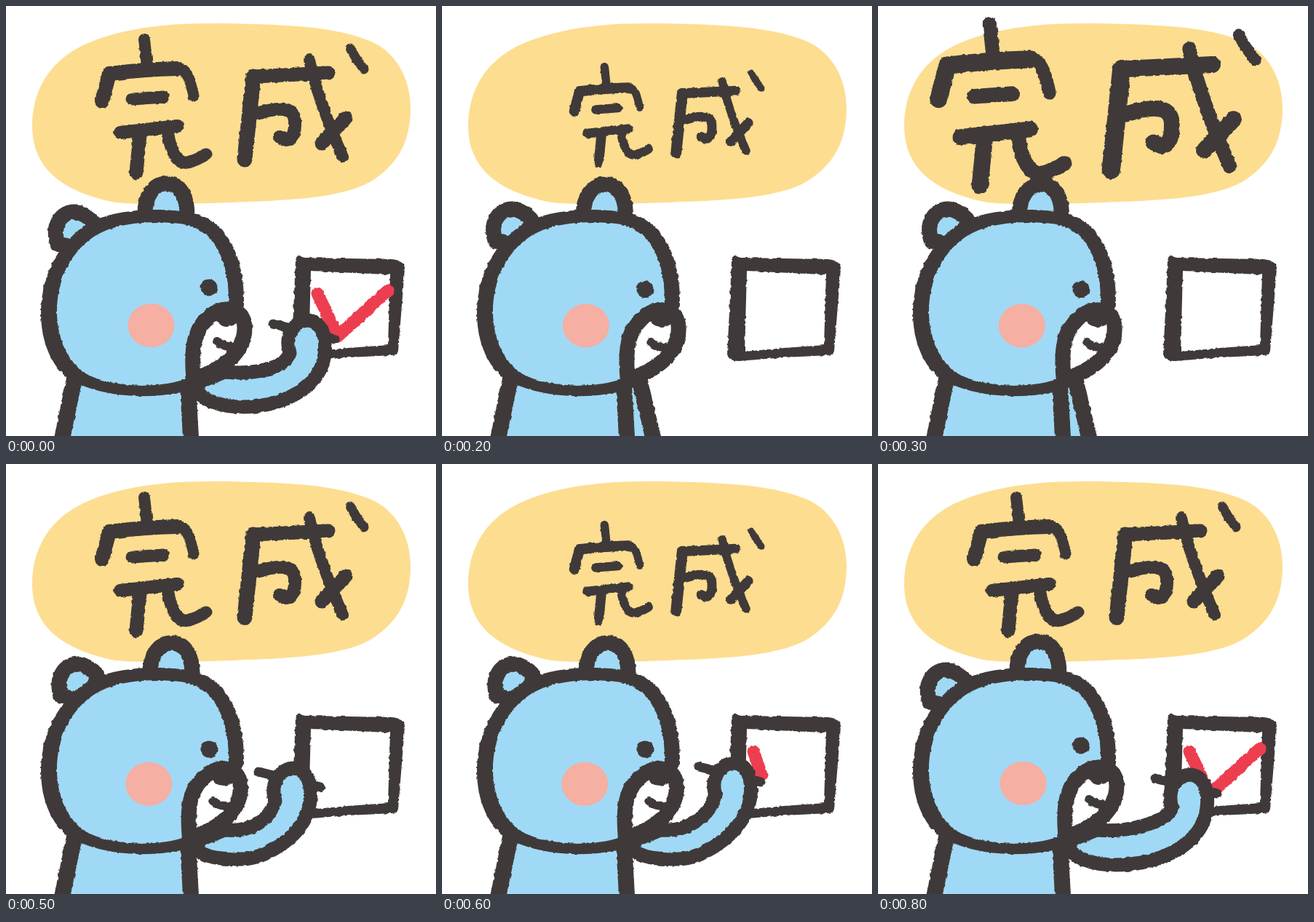
These frames come from a looping animation (591x591 px, 900 ms). An HTML page:

```html
<!DOCTYPE html>
<html lang="zh-Hant">
<head>
<meta charset="utf-8">
<title>完成</title>
<style>
html, body { margin: 0; width: 100%; height: 100%; overflow: hidden; background: #fff; }
svg { display: block; width: 100%; height: 100%; }
.ink { fill: none; stroke: #3f3a39; stroke-linecap: round; stroke-linejoin: round; }
.sky { fill: #a0d9f6; }
.dark { fill: #3f3a39; }
</style>
</head>
<body>
<svg viewBox="0 0 591 591" role="img" aria-label="完成">
  <defs>
    <filter id="rough" filterUnits="userSpaceOnUse" x="-20" y="-20" width="631" height="631" color-interpolation-filters="sRGB">
      <feTurbulence type="fractalNoise" baseFrequency=".16" numOctaves="2" seed="4"/>
      <feDisplacementMap in="SourceGraphic" scale="3.500" xChannelSelector="R" yChannelSelector="G"/>
    </filter>
  </defs>

  <path fill="#fddd90" d="M36 165C37 100 75 65 120 48C180 25 250 23 310 24C390 26 450 28 500 48C540 65 556 105 556 140C556 187 538 219 500 242C458 265 385 267 310 270C250 272 195 274 150 270C80 256 36 225 36 165Z"/>

  <g filter="url(#rough)">
    <g id="word" class="ink"></g>
  </g>

  <g filter="url(#rough)">
    <path class="dark" fill-rule="evenodd" d="M398 349Q399 343 407 344L415 346L530 348Q549 350 548 362L539 474Q538 480 530 480L470 483L408 488Q393 488 392 478L395 420ZM419 364L416 475L470 470L525 466L528 369Q475 367 419 364Z"/>
    <path id="tick" fill="none" stroke="#ed3e50" stroke-width="17" stroke-linecap="round" stroke-linejoin="round"/>
  </g>

  <g filter="url(#rough)">
    <path class="sky" d="M93 510L75 610H255L250 510Z"/>
    <g id="rest">
      <path class="sky" d="M250 522L271 515L294 610H255Z"/>
      <path class="ink" stroke-width="22" d="M272 516L294 610"/>
    </g>
    <path class="ink" stroke-width="22" d="M94 512L74 610M250 522L255 610"/>
    <g id="reach">
      <path id="pen" class="ink" stroke-width="13"/>
      <path id="arm" class="ink" style="fill:#a0d9f6" stroke-width="19"/>
    </g>

    <g class="ink" style="fill:#a0d9f6" stroke-width="21">
      <path id="earL" d="M71 327C62 300 78 282 95 283C106 284 114 291 120 297L112 335Z"/>
      <path id="earR" d="M191 288C190 262 203 244 220 244C240 244 250 262 249 293"/>
    </g>
    <path class="dark" d="M327 412C329 340 300 285 240 282C185 276 135 284 108 302C68 330 48 375 48 422C48 470 70 512 106 522C150 540 220 541 264 524Z"/>
    <path class="sky" d="M306 412C308 350 285 303 238 299C190 294 145 300 118 319C88 340 70 378 70 420C70 460 88 495 115 508C155 526 220 526 255 509Z"/>
    <g id="muzzle">
      <path class="ink" style="fill:#fff" stroke-width="21" d="M258 512C254 470 258 440 285 423C305 410 328 418 328 442C328 475 300 499 258 513Z"/>
      <ellipse class="dark" cx="305" cy="430" rx="16" ry="10"/>
      <path class="ink" stroke-width="12" d="M290 461Q298 468 309 468"/>
    </g>
    <circle id="eye" class="dark" cx="279" cy="387" r="11.500"/>
  </g>
  <ellipse id="cheek" fill="#f5afa3" cx="199.500" cy="439" rx="32" ry="30"/>
</svg>
<script>
const $ = id => document.getElementById(id);
const STEP = 100;

// Brush strokes of the two characters: [width, path]
const strokes = [
  [16, 'M190 46L194 82'],
  [20, 'M132 131L142 93'],
  [20, 'M142 93Q190 87 236 86'],
  [15, 'M236 84C250 88 254 105 258 124'],
  [17, 'M173 128L216 125'],
  [18, 'M157 174L236 165'],
  [19, 'M184 178L179 229'],
  [17, 'M222 172C226 200 236 217 249 215C260 213 268 208 275 204'],
  [19, 'M340 97L443 92'],
  [21, 'M340 97L328 211'],
  [18, 'M345 148C370 140 396 136 397 158Q398 183 385 184L376 180'],
  [16, 'M417 74C424 110 446 170 463 207'],
  [19, 'M467 154L434 189'],
  [13, 'M473 58Q480 72 492 87']
];
$('word').innerHTML = strokes
  .map(([w, d]) => `<path stroke-width="${w}" d="${d}"/>`).join('');

const sizes = {
  small: 'matrix(.7135 0 0 .715 87.7 50.8)',
  medium: '',
  large: 'matrix(1.2095 0 0 1.215 -76.4 -31.2)'
};
const beat = ['medium', 'medium', 'small', 'large'];

const ticks = {
  none: '',
  start: 'M428 395L439 427',
  down: 'M428 395L454 454',
  full: 'M428 395L456 454L525 391'
};

// One pose per step: head lean, tick state, hand position
const full = (x, y) => ({ lean: 0, tick: 'full', hand: [x, y] });
const idle = { lean: 1, tick: 'none' };
const poses = [
  full(416, 432), full(402, 440),
  idle, idle, idle,
  { lean: 2, tick: 'none', hand: [396, 418] },
  { lean: 2, tick: 'start', hand: [402, 411] },
  { lean: 2, tick: 'down', hand: [409, 434] },
  full(430, 427)
];

function armPath(x, y) {
  const low = y < 420 ? 543 : 551;
  return `M255 522L300 503C345 507 ${x - 32} ${y + 65} ${x - 26} ${y + 45}` +
    `C${x - 34} ${y + 18} ${x - 18} ${y} ${x} ${y}` +
    `C${x + 24} ${y + 3} ${x + 26} ${y + 35} ${x + 19} ${y + 60}` +
    `C${x + 5} ${y + 100} ${x - 45} ${low} 325 ${low}C295 ${low} 272 542 258 526Z`;
}

function move(id, x, y) {
  $(id).setAttribute('transform', `translate(${x} ${y})`);
}

function draw(n) {
  const { lean, tick, hand } = poses[n];
  $('word').setAttribute('transform', sizes[beat[n % beat.length]]);
  $('tick').setAttribute('d', ticks[tick]);
  $('rest').style.display = hand ? 'none' : '';
  $('reach').style.display = hand ? '' : 'none';
  if (hand) {
    const [x, y] = hand;
    $('arm').setAttribute('d', armPath(x, y));
    $('pen').setAttribute('d', `M${x - 49} ${y + 5}L${x + 36} ${y + 26}`);
  }
  move('earL', 2.3 * lean, -4 * lean);
  move('earR', 3.5 * lean, lean);
  move('muzzle', -2.8 * lean, lean);
  move('eye', 0, 2.5 * lean);
  move('cheek', -1.6 * lean, 0.4 * lean);
}

let shown = -1;
function loop() {
  const n = Math.floor(performance.now() / STEP) % poses.length;
  if (n !== shown) draw(shown = n);
  requestAnimationFrame(loop);
}
loop();
</script>
</body>
</html>
```
